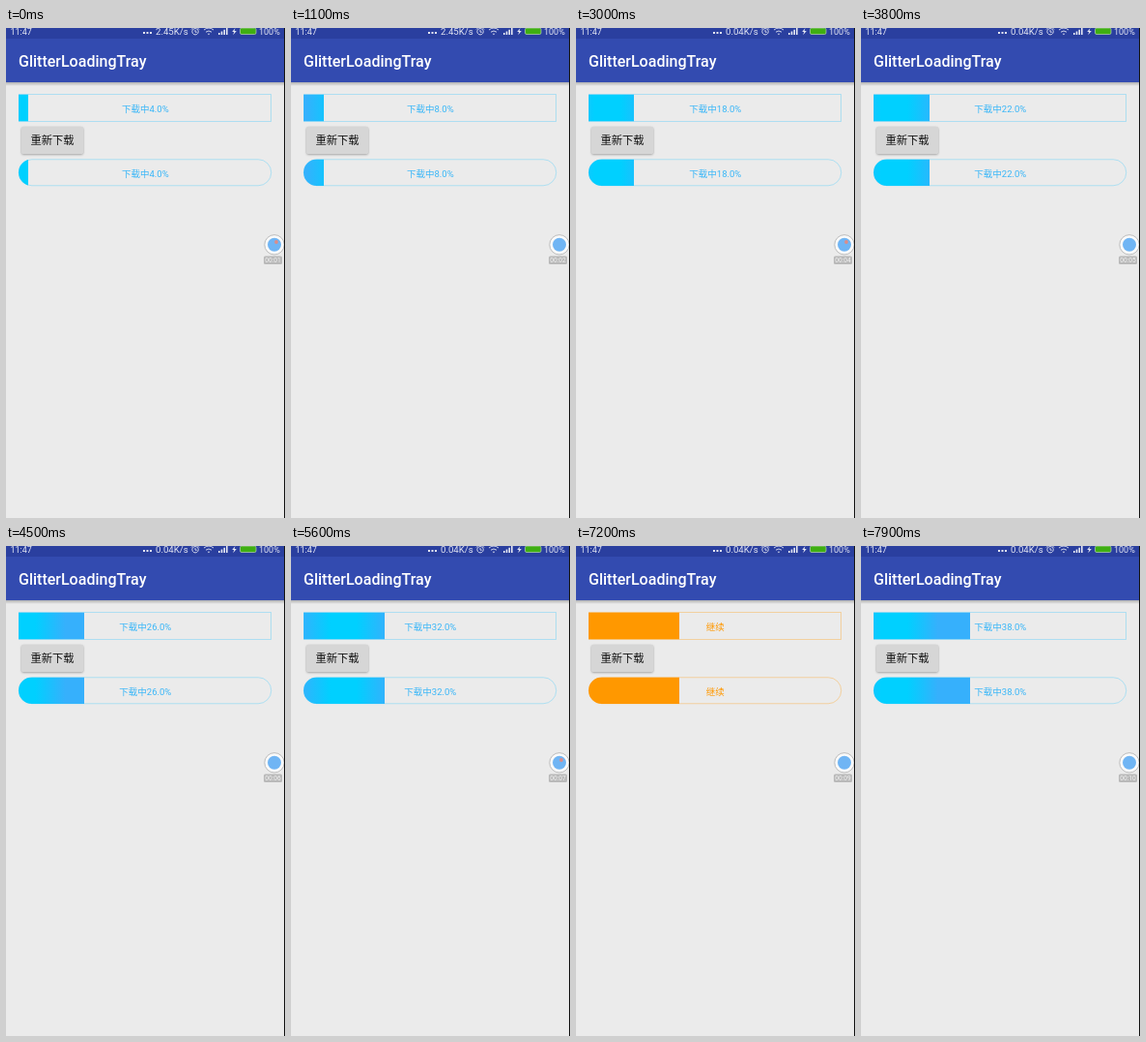
Write an HTML page that moves like this. It is 289 px wide and 506 px high and loops after 8000 ms.

```html
<!DOCTYPE html>
<html lang="zh">
<head>
<meta charset="utf-8">
<style>
  html, body { margin: 0; width: 100%; height: 100%; overflow: hidden; background: #ebebeb; }
  svg { display: block; width: 289px; height: 506px; font-family: Roboto, "Noto Sans CJK SC", "Noto Sans CJK", sans-serif; }
</style>
</head>
<body>
<svg viewBox="0 0 289 506">
  <defs>
    <linearGradient id="glow" gradientUnits="userSpaceOnUse" y1="0" y2="0">
      <stop offset="0" stop-color="#36b0fc"/>
      <stop offset=".35" stop-color="#00d0ff"/>
      <stop offset=".65" stop-color="#00d0ff"/>
      <stop offset="1" stop-color="#36b0fc"/>
    </linearGradient>
    <linearGradient id="shade" x2="0" y2="1">
      <stop offset="0" stop-color="#000" stop-opacity=".25"/>
      <stop offset="1" stop-color="#000" stop-opacity="0"/>
    </linearGradient>
    <filter id="soft"><feGaussianBlur stdDeviation=".8"/></filter>
    <clipPath id="square"><rect x="13" y="68.5" width="262" height="28"/></clipPath>
    <clipPath id="pill"><rect x="13" y="135.5" width="262" height="27.5" rx="13.75"/></clipPath>
  </defs>
  <rect width="289" height="506" fill="#ebebeb"/>

  <rect y="56" width="289" height="4" fill="url(#shade)"/>
  <rect width="289" height="56" fill="#334bb0"/>
  <rect width="289" height="11" fill="#2a3f9f"/>
  <g fill="#e4e6f2" font-size="9.6">
    <text x="4.5" y="6.6" font-size="9">11:47</text>
    <text id="speed" x="155" y="6.6"></text>
    <text x="262" y="6.5" font-size="9">100%</text>
    <path d="M142 4h2v2h-2zm3.5 0h2v2h-2zm3.5 0h2v2h-2z"/>
    <path d="M220 7V5h1.6v2zm2.7 0V3.5h1.6V7zm2.7 0V1.8h1.6V7zm2.6 0V0h1.6v7zM237.5 0l-3.3 4h2l-1 3.2 3.6-4.3h-2.2zM208.8 5.8h2.4L210 7.3z"/>
    <path d="M205 2q5-4 10 0M207 4.2q3-2.4 6 0M196 .5a3.2 3.2 0 1 0 .1 0M196 2v2.2h1.8M192 1.5l1.5-1.5M200 1.5l-1.5-1.5" fill="none" stroke="#e4e6f2" stroke-width=".9"/>
  </g>
  <rect x="242.5" y="0" width="16.5" height="6.5" rx="1.5" fill="#3fae12" stroke="#b9d6b4" stroke-width=".7"/>
  <text x="13" y="39.5" font-size="16" font-weight="500" fill="#fff">GlitterLoadingTray</text>

  <rect x="16" y="102.8" width="64" height="28" rx="2" fill="#999" filter="url(#soft)"/>
  <rect x="16" y="102" width="64" height="28" rx="1.5" fill="#d6d6d6"/>
  <text x="48" y="120.3" font-size="11.3" text-anchor="middle" fill="#111">重新下载</text>

  <g id="bars" font-size="9.5" text-anchor="middle"></g>

  <circle cx="278" cy="223.8" r="10.2" fill="#fafafa" stroke="#bdbdbd"/>
  <circle cx="278" cy="223.8" r="7" fill="#70b5f4"/>
  <circle id="blink" cx="280" cy="221" r="1.9" fill="#dd8c88"/>
  <rect x="267" y="235.5" width="19" height="8.5" rx="1.5" fill="#b9b9b9"/>
  <text id="clock" x="276.5" y="242.2" font-size="6.6" text-anchor="middle" fill="#f4f4f4"></text>
  <rect x="288" width="1" height="506" fill="#111"/>
</svg>
<script>
  const LOOP = 8000, FRAME = 100, STEP = 387;
  const PAUSE = 6300, RESUME = 7700;
  const SWEEPS = [0, 590, 1230, 1880, 2640, 3430, 4230, 5120, 6130];
  const $ = id => document.getElementById(id);

  const bar = (clip, y, height, rx) => `
    <rect class="fill" x="13" y="${y}" height="${height}" clip-path="url(#${clip})"/>
    <rect class="edge" x="13.25" y="${y + .25}" width="261.5" height="${height - .5}" rx="${rx}"
      fill="none" stroke-width=".5" stroke-opacity=".65"/>
    <text class="label" x="144.3" y="${y + 18.7}"></text>`;
  $('bars').innerHTML = bar('square', 68.5, 28, 0) + bar('pill', 135.5, 27.5, 13.5);

  const each = (name, change) => document.querySelectorAll('.' + name).forEach(change);

  function draw(now) {
    const t = Math.floor(now % LOOP / FRAME) * FRAME;
    const paused = t >= PAUSE && t < RESUME;
    const progress = t >= RESUME + FRAME ? 38 : 4 + 2 * Math.floor(Math.min(t, PAUSE) / STEP);

    // The glow holds at the start and while paused.
    const active = t < PAUSE ? Math.max(t, 300) : PAUSE + Math.max(0, t - RESUME);
    const start = SWEEPS.filter(s => s <= active).pop();
    const centre = -32 + .18 * (active - start);
    $('glow').setAttribute('x1', centre - 45);
    $('glow').setAttribute('x2', centre + 45);

    const color = paused ? '#ff9800' : '#38b6f8';
    each('fill', e => {
      e.setAttribute('width', Math.round(2.62 * progress));
      e.setAttribute('fill', paused ? color : 'url(#glow)');
    });
    each('edge', e => e.setAttribute('stroke', paused ? color : '#30c4fa'));
    each('label', e => {
      e.setAttribute('fill', color);
      e.textContent = paused ? '继续' : `下载中${progress.toFixed(1)}%`;
    });

    const seconds = t >= RESUME ? 10 : t >= PAUSE ? 9 : 1 + Math.floor((t + 80) / 890);
    $('clock').textContent = '00:' + String(seconds).padStart(2, '0');
    $('blink').setAttribute('opacity', (t + 750) % 3000 < 1500 ? 1 : 0);
    $('speed').textContent = t < 2400 ? '2.45K/s' : '0.04K/s';
    requestAnimationFrame(draw);
  }
  requestAnimationFrame(draw);
</script>
</body>
</html>
```
